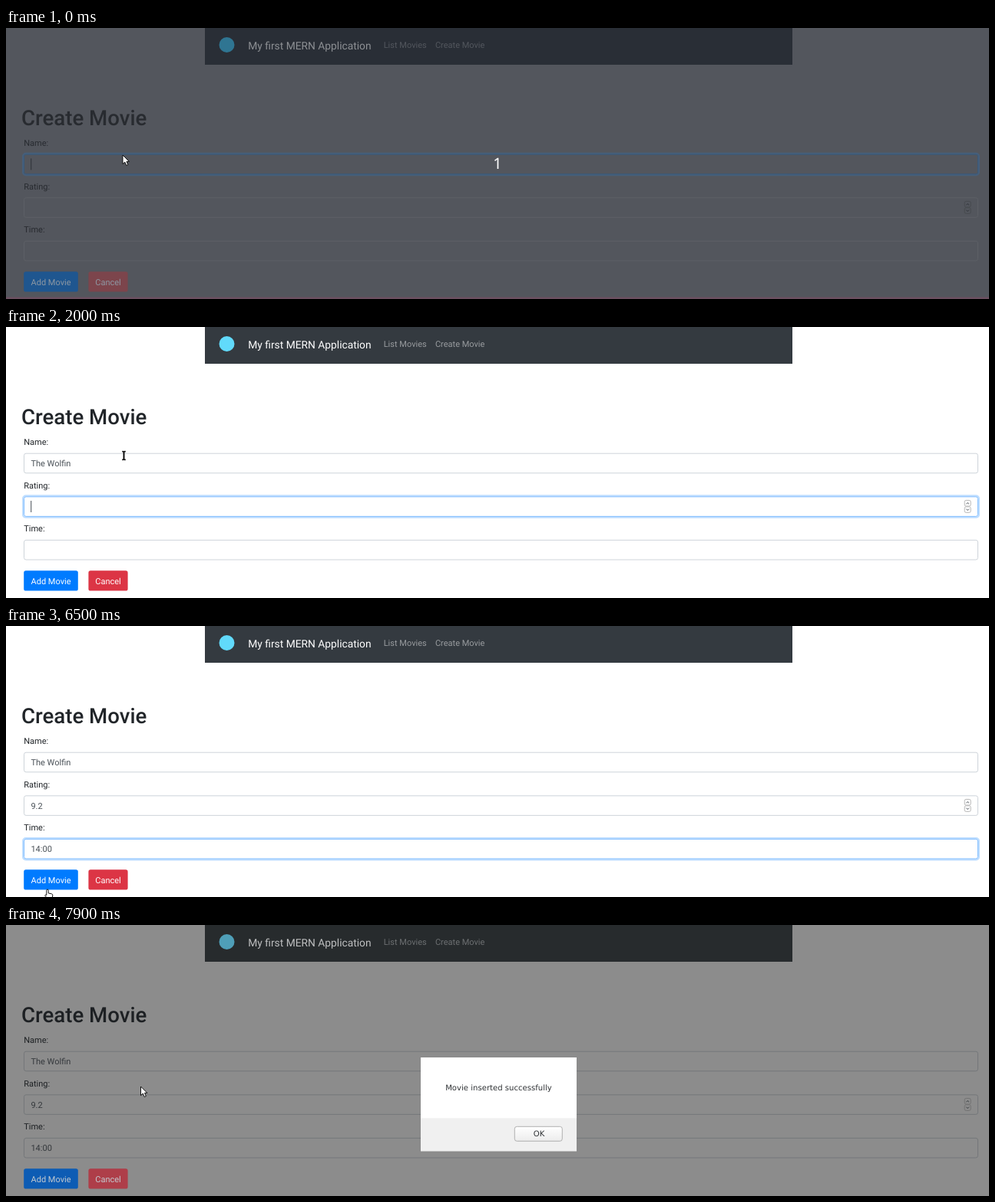
Write an HTML page that moves like this. It is 1280 by 354 pixels and loops after 8000 ms.

```html
<!DOCTYPE html>
<html lang="en">
<head>
<meta charset="utf-8">
<title>Create Movie</title>
<style>
html, body { margin: 0; width: 100%; height: 100%; overflow: hidden; background: #fff; }
svg { display: block; width: 100vw; height: 100vh; }
text { font: 11.03px Roboto, sans-serif; text-rendering: geometricPrecision; white-space: pre; fill: var(--text); }
.page { fill: var(--page); }
.nav { fill: var(--nav); }
.icon { fill: var(--icon); }
.brand { font-size: 13.8px; fill: var(--brand); }
.link { fill: var(--link); }
h1, .title { font-size: 27.6px; font-weight: 500; }
.value { fill: var(--value); }
.box { fill: var(--field); }
.glow { fill: none; stroke: var(--glow); stroke-width: 2.3; }
.caret { fill: var(--value); }
.spin { fill: var(--field); stroke: var(--mark); stroke-width: .8; }
.chevron { fill: none; stroke: var(--value); stroke-width: 1; }
.red { fill: var(--red); }
.label { fill: var(--label); text-anchor: middle; }
.cursor { fill: #fff; stroke: #000; stroke-width: .9; stroke-linejoin: round; }
.count { font: 20px "Noto Sans", sans-serif; fill: #fff; text-anchor: middle; }
.alert text { font: 10.1px "DejaVu Sans", sans-serif; fill: #303336; text-anchor: middle; }
</style>
</head>
<body>
<svg viewBox="0 0 1280 354" preserveAspectRatio="none">
  <defs>
    <linearGradient id="shade" x2="0" y2="1">
      <stop stop-color="#fff"/><stop offset="1" stop-color="#ececec"/>
    </linearGradient>
  </defs>
  <rect class="page" width="1280" height="354"/>
  <rect class="nav" x="259" width="765" height="48"/>
  <circle class="icon" cx="287.5" cy="22" r="10"/>
  <text class="brand" x="315.3" y="27.6">My first MERN Application</text>
  <text class="link" x="491.7" y="26.4">List Movies</text>
  <text class="link" x="558.9" y="26.4">Create Movie</text>
  <text class="title" x="20" y="127">Create Movie</text>
  <g id="fields"></g>
  <g class="spin">
    <rect x="1248.2" y="226.4" width="8" height="7.6" rx="2"/>
    <rect x="1248.2" y="234.8" width="8" height="7.6" rx="2"/>
    <path class="chevron" d="M1250.4 231.3l1.8-1.8 1.8 1.8M1250.4 237.7l1.8 1.8 1.8-1.8"/>
  </g>
  <rect id="add" x="23.2" y="318.2" width="70.6" height="26.4" rx="2.7"/>
  <text class="label" x="58.5" y="335.5">Add Movie</text>
  <rect class="red" x="107.4" y="318.2" width="51.2" height="26.4" rx="2.7"/>
  <text class="label" x="133" y="335.5">Cancel</text>
  <g id="count">
    <rect y="351.5" width="1280" height="2.5" fill="#6c5061"/>
    <text class="count" x="640" y="184.3">1</text>
  </g>
  <g class="alert" id="alert">
    <rect x="540" y="173" width="203" height="122.3" fill="#fff"/>
    <rect x="540" y="252.3" width="203" height="43" fill="#f0f0f0"/>
    <text x="641.5" y="216">Movie inserted successfully</text>
    <rect x="662.3" y="263.3" width="62" height="19" rx="3" fill="url(#shade)" stroke="#aaa" stroke-width=".9"/>
    <text x="694" y="276.4">OK</text>
  </g>
  <path class="cursor" id="cursor"/>
</svg>
<script>
const $ = id => document.getElementById(id);
const clamp = v => Math.max(0, Math.min(1, v));
const ramp = (t, start, length) => clamp((t - start) / length);

// colours: [normal, behind the countdown, behind the alert]
const palette = {
  page: ['#ffffff', '#53565d', '#8c8c8c'],
  field: ['#ffffff', '#53565d', '#8c8c8c'],
  nav: ['#343a40', '#292e36', '#272b2d'],
  icon: ['#61dafb', '#2f7592', '#4f9fb8'],
  brand: ['#ffffff', '#8d9094', '#bebfc0'],
  link: ['#999c9f', '#53575e', '#6d7072'],
  text: ['#212529', '#282b30', '#1d2023'],
  value: ['#495057', '#2e3238', '#34383c'],
  border: ['#ced4da', '#5d6066', '#74777a'],
  mark: ['#a5a5a5', '#45484c', '#6c6c6c'],
  focus: ['#80bdff', '#38597c', '#5a7fa8'],
  glow: ['#bfdeff', '#465f7a', '#8c9cae'],
  blue: ['#007bff', '#1f568f', '#0d5cb4'],
  hover: ['#0069d9', '#1f568f', '#0d5cb4'],
  red: ['#dc3545', '#7c454c', '#ae3e49'],
  label: ['#ffffff', '#8e98a3', '#c3cad0']
};
const mix = (a, b, p) => {
  const at = (c, i) => parseInt(c.substr(1 + 2 * i, 2), 16);
  return '#' + [0, 1, 2].map(i =>
    Math.round(at(a, i) + (at(b, i) - at(a, i)) * p).toString(16).padStart(2, '0')).join('');
};

// each field: focus span and the time every character appears
const fields = [
  { name: 'Name:', text: 'The Wolfin', from: -500, to: 1750, hide: 1800,
    keys: [400, 500, 600, 700, 900, 1200, 1300, 1500, 1500, 1600] },
  { name: 'Rating:', text: '9.2', from: 1750, to: 4050, hide: 4100, keys: [2800, 3400, 3900] },
  { name: 'Time:', text: '14:00', from: 4050, to: 7420, hide: 6000, keys: [4800, 4900, 5100, 5300, 5400] }
];
$('fields').innerHTML = fields.map((f, i) => {
  const y = 165.2 + 56.6 * i;
  return `<text x="23.2" y="${y - 11.2}">${f.name}</text>
    <rect class="glow" x="22.1" y="${y - 1.3}" width="1244.8" height="28.2" rx="3.8"/>
    <rect class="box" x="23.5" y="${y}" width="1242" height="25.6" rx="2.6"/>
    <text class="value" x="32.4" y="${y + 16.9}"></text>
    <rect class="caret" y="${y + 5.2}" width="1" height="15"/>`;
}).join('');
const parts = name => [...document.querySelectorAll('#fields ' + name)];
const glows = parts('.glow'), boxes = parts('.box'), values = parts('.value'), carets = parts('.caret');

const shapes = {
  arrow: 'M0 0V11.6L2.8 9.1 4.7 13.5 6.8 12.6 5 8.4H8.4Z',
  beam: 'M-2-6H-.5L0-5.5.5-6H2V-4.7H.7V4.7H2V6H.5L0 5.5-.5 6H-2V4.7H-.7V-4.7H-2Z',
  hand: 'M-1.2.8a1.2 1.2 0 0 1 2.4 0V4.5L5.5 5.4Q7 5.8 6.8 7.5L6 11.5H0L-3.4 7.4Q-2.6 5.8-1.2 7Z'
};
// pointer: time, x, y, shape
const track = [
  [0, 152, 166, 'arrow'], [399, 152, 166, 'arrow'], [400, 153.5, 168, 'beam'], [5799, 153.5, 168, 'beam'],
  [5800, 152, 166, 'arrow'], [5900, 152, 166, 'arrow'], [6000, 150, 148, 'arrow'], [6300, 78, 310, 'arrow'],
  [6400, 57, 348, 'arrow'], [6500, 54, 344.5, 'hand'], [6700, 53.5, 332.5, 'hand'], [7199, 53.5, 332.5, 'hand'],
  [7200, 57, 332.5, 'hand'], [7500, 57, 332.5, 'hand'], [7600, 76, 312, 'arrow'], [7900, 175.5, 211, 'arrow'],
  [8000, 175.5, 211, 'arrow']
];

function draw(t) {
  const counting = t < 400, dim = ramp(t, 7500, 400);
  const colour = {};
  for (const key in palette) {
    const [normal, dark, behind] = palette[key];
    colour[key] = counting ? dark : mix(normal, behind, dim);
    document.documentElement.style.setProperty('--' + key, colour[key]);
  }
  $('count').style.display = counting ? '' : 'none';
  $('alert').style.opacity = ramp(t, 7600, 200);
  $('add').style.fill = mix(colour.blue, colour.hover, ramp(t, 6500, 150));

  fields.forEach((f, i) => {
    const focus = ramp(t, f.from, 160) - ramp(t, f.to, 160);
    glows[i].style.opacity = focus;
    boxes[i].style.stroke = mix(colour.border, colour.focus, focus);
    values[i].textContent = f.text.slice(0, f.keys.filter(k => k <= t).length);
    const blink = t >= 3000 && t < 3400;
    carets[i].style.display = t >= f.from && t < f.hide && !blink ? '' : 'none';
    carets[i].setAttribute('x', 32.2 + values[i].getComputedTextLength());
  });

  const n = track.findIndex(k => k[0] > t), a = track[n - 1], b = track[n];
  const p = (t - a[0]) / (b[0] - a[0]);
  const x = a[1] + (b[1] - a[1]) * p, y = a[2] + (b[2] - a[2]) * p;
  $('cursor').setAttribute('d', shapes[a[3]]);
  $('cursor').setAttribute('transform', `translate(${x} ${y})`);
  const beam = a[3] === 'beam';
  $('cursor').style.fill = beam ? '#000' : '#fff';
  $('cursor').style.strokeWidth = beam ? .4 : .9;
}

function tick() {
  draw(Math.floor(performance.now() % 8000 / 100) * 100);
  requestAnimationFrame(tick);
}
tick();
</script>
</body>
</html>
```
